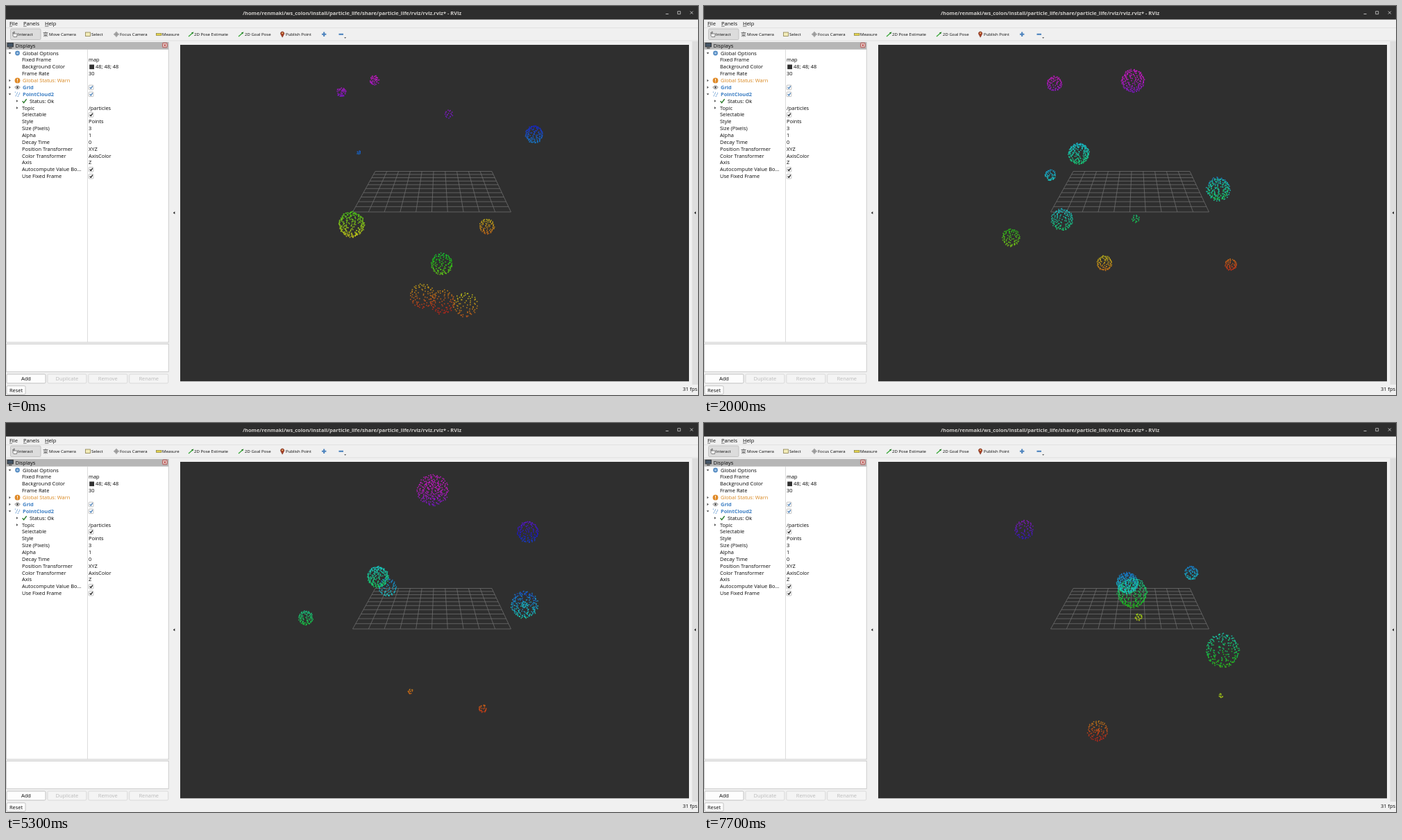
Write an HTML page with a canvas that moves like this. It is 997 by 561 pixels and loops after 7800 ms.

```html
<!DOCTYPE html>
<html lang="en">
<head>
<meta charset="utf-8">
<title>Particle viewer</title>
<style>
html, body { margin: 0; width: 997px; height: 561px; overflow: hidden; background: #f0f0f0; }
svg, canvas { position: absolute; left: 0; top: 0; display: block; }
text { font-family: "Open Sans", "Noto Sans", sans-serif; white-space: pre; }
</style>
</head>
<body>
<svg id="ui" width="997" height="561" viewBox="0 0 997 561"></svg>
<canvas id="cloud" width="997" height="561"></canvas>
<script>
const ui = document.getElementById('ui');
const ctx = document.getElementById('cloud').getContext('2d');

function node(tag, attrs, label) {
  const el = document.createElementNS('http://www.w3.org/2000/svg', tag);
  for (const key in attrs) el.setAttribute(key, attrs[key]);
  if (label) el.textContent = label;
  ui.append(el);
  return el;
}
const box = (x, y, width, height, fill, more) => node('rect', { x, y, width, height, fill, ...more });
const path = (d, stroke, width = 1, fill = 'none') => node('path', { d, stroke, 'stroke-width': width, fill });
const disc = (cx, cy, r, fill) => node('circle', { cx, cy, r, fill });
const text = (x, y, label, more) => node('text', { x, y, 'font-size': 7.45, fill: '#080808', ...more }, label);
const mid = { 'text-anchor': 'middle' };
const bold = { 'font-weight': 700 };

function titleBar() {
  box(0, 0, 997, 19.5, '#2d2d2d');
  text(498.5, 12.5, '/home/renmaki/ws_colon/install/particle_life/share/particle_life/rviz/rviz.rviz* - RViz',
    { ...mid, ...bold, 'font-size': 7.5, fill: '#d0cecb' });
  path('M950.5 11.5h4', '#ccc', 0.9);
  path('M967.7 7.7h4v4h-4z', '#ccc', 0.8);
  path('M985.8 7.6l4 4m0-4l-4 4', '#ccc', 0.9);
}

function menus() {
  [[5, 'File', 4], [25, 'Panels', 4.6], [56, 'Help', 5.4]].forEach(([x, label, w]) => {
    text(x, 27.6, label, { 'font-size': 7.5 });
    path(`M${x} 29.2h${w}`, '#222', 0.6);
  });
  path('M0 31.5H997', '#dedede', 0.8);
}

function arrowIcon(x) {
  path(`M${x} 44L${x + 6} 38.8`, '#38a838', 1.3);
  path(`M${x + 7.5} 37.5l-3.5 .8l2 2.3z`, 'none', 0, '#207820');
}

function toolBar() {
  box(6.5, 33, 43.5, 15.5, '#dcdcdc', { rx: 1.5, stroke: '#b9b9b9', 'stroke-width': 0.8 });
  const labels = [[17, 'Interact'], [62, 'Move Camera'], [123, 'Select'], [164, 'Focus Camera'],
    [225, 'Measure'], [271, '2D Pose Estimate'], [344, '2D Goal Pose'], [403, 'Publish Point']];
  labels.forEach(([x, label]) => text(x, 42.9, label, { 'font-size': 6.05 }));
  path('M10 38v5l1 1.5h4.5l.7-4.5h-4v-3h-1v3.5z', '#555', 0.7, '#f8f8f8');
  path('M53.5 38.5h7m-5.5 0v4h4v-4M57 37v7.5M54 44l3-2l3 2', '#666', 0.8);
  box(114.5, 38, 7, 5.5, '#f3ecb8', { stroke: '#8a8050', 'stroke-width': 0.8 });
  path('M155 40.8h8M159 36.8v8', '#666', 0.8);
  path('M157 38.8h4v4h-4z', '#777', 0.7);
  box(216.3, 39.6, 7.7, 2.7, '#e2d14c', { stroke: '#77702a', 'stroke-width': 0.6 });
  arrowIcon(263);
  arrowIcon(335);
  path('M398.2 45.2l-2.5-4.6a2.7 2.7 0 1 1 5 0z', '#6d3020', 0.5, '#a53c22');
  disc(398.2, 39.3, 1, '#f0d080');
  path('M455 40.8h6.4M458.2 37.6v6.4', '#4b82bd', 2.1);
  path('M479.5 40.8h6.5', '#4b82bd', 2.1);
  path('M487.2 45.2h3l-1.5 1.6z', 'none', 0, '#333');
  path('M0 50H997', '#dcdcdc', 0.8);
}

const rowY = i => 68 + 9.865 * i;

function check(x, y, blue) {
  box(x, y - 3.2, 6.6, 6.6, '#fff', { stroke: '#b4b4b4', 'stroke-width': 0.8, rx: 0.8 });
  path(`M${x + 1.5} ${y}l1.5 1.8l2.5-3.7`, blue ? '#3f78b4' : '#111', 1.2);
}

function fold(x, y, open) {
  const d = open ? `M${x - 1.8} ${y - 1}h3.6l-1.8 2.2z` : `M${x - 1} ${y - 1.8}v3.6l2.2-1.8z`;
  path(d, 'none', 0, '#444');
}

function displays() {
  box(0, 52, 234.5, 10.5, '#b6b6b6');
  box(2, 53.3, 8.3, 5.6, '#456', { stroke: '#222', 'stroke-width': 0.8 });
  path('M4 60.7h4.5', '#222', 1);
  text(13.5, 59.8, 'Displays');
  box(225.6, 53.2, 6.6, 6.6, '#e6d4d0', { stroke: '#a33', 'stroke-width': 0.8, rx: 1 });
  path('M227.3 55l3.2 3.2m0-3.2l-3.2 3.2', '#b22', 1);

  box(0.4, 62.5, 233.8, 422.5, '#fff', { stroke: '#c2c2c2', 'stroke-width': 0.8 });
  path('M117.5 63V485', '#d8d8d8', 0.9);
  const rows = [['Global Options'], ['Fixed Frame', 'map'], ['Background Color', '48; 48; 48'], ['Frame Rate', '30'],
    ['Global Status: Warn'], ['Grid', true], ['PointCloud2', true], ['Status: Ok'], ['Topic', '/particles'],
    ['Selectable', true], ['Style', 'Points'], ['Size (Pixels)', '3'], ['Alpha', '1'], ['Decay Time', '0'],
    ['Position Transformer', 'XYZ'], ['Color Transformer', 'AxisColor'], ['Axis', 'Z'],
    ['Autocompute Value Bo…', true], ['Use Fixed Frame', true]];
  rows.forEach(([label, value], i) => {
    const y = rowY(i), head = i === 5 || i === 6;
    const style = head ? { ...bold, fill: '#3d7fc4' } : i === 4 ? { fill: '#d8851c' } : {};
    text(i === 7 ? 34 : head || i === 0 || i === 4 ? 24 : 23, y + 2.6, label, style);
    if (value === true) check(119.3, y, head);
    else if (value) text(i === 2 ? 129 : 119, y + 2.6, value);
  });
  box(120.2, rowY(2) - 3.2, 6.8, 6.6, '#303030');
  [[5.5, 0, 1], [5.5, 4], [5.5, 5], [5.5, 6, 1], [16, 7], [16, 8]].forEach(([x, i, open]) => fold(x, rowY(i), open));

  disc(16.5, rowY(0), 3.4, '#5a8fc4');
  disc(16.5, rowY(0), 1.3, '#b8d4ee');
  disc(16.5, rowY(4), 3.9, '#e08a28');
  path(`M16.5 ${rowY(4) - 2.4}v2.8m0 .9v1`, '#fff', 1);
  path(`M12.8 ${rowY(5)}q3.7-4.6 7.4 0q-3.7 4.6-7.4 0z`, '#555', 0.8);
  disc(16.5, rowY(5), 1.4, '#444');
  for (let i = 0; i < 9; i++) disc(13.4 + i * 3.1 % 7, rowY(6) - 3 + i * 0.78, 0.65, '#5d95cf');
  path(`M23.6 ${rowY(7)}l2 2.6l4-5.4`, '#2a7a2a', 1.4);
}

function button(x, y, w, h, label, on) {
  box(x, y, w, h, on ? '#fdfdfd' : '#f4f4f4', { rx: 1.6, stroke: on ? '#b4b4b4' : '#d2d2d2', 'stroke-width': 0.8 });
  text(x + w / 2, y + h / 2 + 2.7, label, { ...mid, fill: on ? '#080808' : '#bababa' });
}

function footer() {
  box(0.4, 487.4, 233.8, 40, '#fff', { stroke: '#c2c2c2', 'stroke-width': 0.8 });
  ['Add', 'Duplicate', 'Remove', 'Rename'].forEach((label, i) => button(1 + i * 58.9, 531, 56, 13, label, i === 0));
  button(1, 547.8, 27, 12.2, 'Reset', true);
  text(996, 554.6, '31 fps', { 'text-anchor': 'end' });
}

function viewport() {
  box(988.5, 51, 8.5, 495, '#dedede');
  path('M243.3 296.2v4l-2.5-2z', 'none', 0, '#222');
  path('M994 296.2v4l-2.5-2z', 'none', 0, '#222');
  box(251, 56, 733, 485.3, '#2f2f2f');
  const far = 168, near = 228;
  let d = '';
  for (let k = 0; k <= 10; k++) {
    const u = k / 10;
    const w = 1 / (u / far + (1 - u) / near);
    const v = (w - far) / (near - far);
    d += `M${532 - 32.5 * v} ${238.5 + 58.5 * v}h${w}`;
    d += `M${532 + far * u} 238.5L${499.5 + near * u} 297`;
  }
  path(d, '#707070', 0.75);
}

[titleBar, menus, toolBar, displays, footer, viewport].forEach(draw => draw());

const LOOP = 7800, STEP = 100;
const moments = [0, 700, 2000, 4000, 5300, 6700, 7700];
const radiusMoments = [0, 4000, 7700];
const GOLDEN = Math.PI * (3 - Math.sqrt(5));

function random(seed) {
  return () => {
    seed = (seed * 16807) % 2147483647;
    return seed / 2147483647;
  };
}
const rnd = random(7919);

// A jittered spiral spreads the points evenly over a shell.
function shell(count) {
  const dots = Array.from({ length: count }, (_, i) => {
    const y = 1 - 2 * (i + rnd()) / count;
    return { y, ring: Math.sqrt(1 - y * y), turn: i * GOLDEN + rnd() * 0.5, depth: 0.88 + 0.12 * rnd(), order: rnd() };
  });
  return dots.sort((a, b) => a.order - b.order);
}

// The way is one point per moment; a shorter way ends by merging into its host.
// Tint shifts the colour for swarms lying nearer to or farther from the camera.
function swarm(count, tint, radii, way, host) {
  if (host) way = [...way, ...host.way.slice(way.length)];
  return { tint, radii, way, dots: shell(count) };
}

const violet = swarm(170, 10, [7, 27, 16],
  [[531, 107], [553, 157], [618, 108], [571, 110], [615, 97], [615, 165], [610, 231]]);
const blue = swarm(130, 2, [13, 19, 10],
  [[761, 185], [719, 144], [741, 264], [670, 143], [752, 157], [632, 210], [702, 216]]);
const cyan = swarm(75, 18, [3, 13, 14],
  [[508, 211], [501, 171], [499, 244], [468, 177], [550, 237], [460, 165], [461, 154]]);
const lime = swarm(230, -27, [19, 12, 22],
  [[498, 315], [487, 279], [540, 213], [459, 250], [536, 222], [615, 165], [617, 245]]);
const green = swarm(130, 52, [16, 16, 25],
  [[628, 372], [543, 368], [516, 308], [688, 326], [747, 262], [788, 240], [747, 328]]);
const orange = swarm(75, -66, [11, 6, 5],
  [[693, 318], [723, 344], [759, 373], [693, 441], [687, 412], [656, 341], [626, 280]]);
const amber = swarm(85, 8, [18, 8, 15],
  [[600, 418], [553, 411], [442, 334], [567, 427], [432, 281], [478, 394], [567, 444]]);
const speck = swarm(18, 30, [6, 5, 3],
  [[638, 156], [613, 243], [622, 307], [636, 144], [747, 262], [760, 349], [745, 393]]);
const swarms = [violet, blue, cyan, lime, green, orange, amber, speck,
  swarm(75, 12, [7, 15, 14], [[483, 124], [464, 143], [505, 112], [686, 84]], violet),
  swarm(85, -18, [18, 4, 3], [[629, 427], [592, 407], [577, 371], [688, 428], [583, 387], [608, 306]], amber),
  swarm(75, 32, [18, 18, 25], [[662, 431], [696, 390], [741, 264]], green)];

const mix = (a, b, u) => a + (b - a) * u;
const clamp = (v, lo, hi) => Math.max(lo, Math.min(hi, v));

function along(stops, values, t) {
  let i = 0;
  while (i < stops.length - 2 && t >= stops[i + 1]) i++;
  const u = clamp((t - stops[i]) / (stops[i + 1] - stops[i]), 0, 1);
  return [values[i]].flat().map((v, k) => mix(v, [values[i + 1]].flat()[k], u));
}

function drawCloud(t) {
  ctx.clearRect(0, 0, 997, 561);
  for (const { tint, radii, way, dots } of swarms) {
    const [x, y] = along(moments, way, t);
    const [r] = along(radiusMoments, radii, t);
    const hue = clamp(300 - 0.85 * (y - 90) + tint, 18, 298);
    for (const dot of dots.slice(0, Math.round(3 + 0.8 * r * r))) {
      const dx = Math.cos(dot.turn + t * 0.0012) * dot.ring * dot.depth * r;
      const dy = dot.y * dot.depth * r;
      ctx.fillStyle = `hsla(${clamp(hue - dy * 1.2, 5, 300)}, 80%, 46%, 0.8)`;
      ctx.fillRect(x + dx - 0.8, y + dy - 0.8, 1.6, 1.6);
    }
  }
}

const start = performance.now();
function frame() {
  const t = (performance.now() - start) % LOOP;
  drawCloud(Math.floor(t / STEP) * STEP);
  requestAnimationFrame(frame);
}
frame();
</script>
</body>
</html>
```
